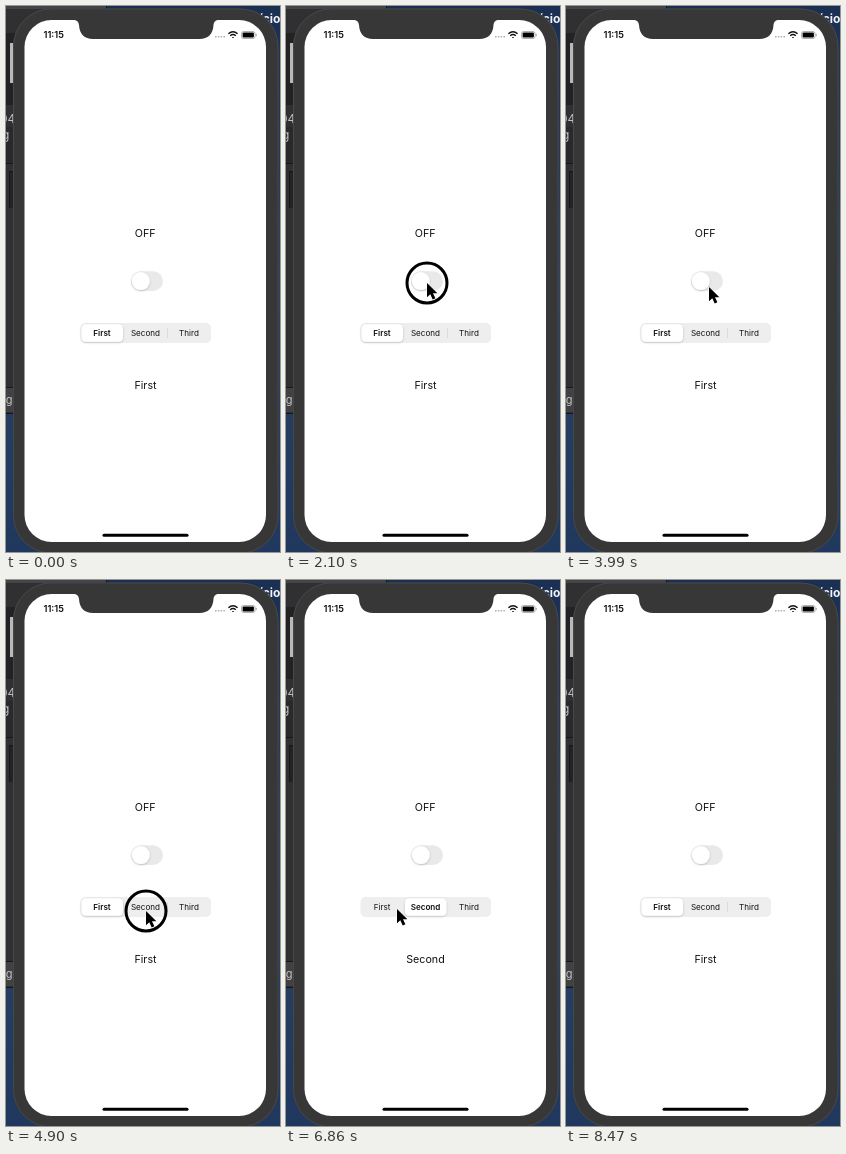
Animation, 274 px wide and 546 px high, one loop 8960 ms. Source, as an HTML page:

```html
<!DOCTYPE html>
<html lang="en">
<head>
<meta charset="utf-8">
<title>Switch and segments</title>
<style>
  html, body { margin: 0; width: 100%; height: 100%; overflow: hidden; background: #1f3456; }
  svg { display: block; width: 274px; height: 546px; }
  text { font-family: Inter, Roboto, "Liberation Sans", sans-serif; }
  .label { font-size: 10.7px; text-anchor: middle; fill: #111; }
  .seg { font-size: 8.1px; text-anchor: middle; fill: #111; }
  .desk { font-size: 12px; fill: #c4c4c6; }
</style>
</head>
<body>
<svg viewBox="0 0 274 546" xmlns="http://www.w3.org/2000/svg">
  <defs>
    <linearGradient id="sea" x1="0" y1="0" x2="0" y2="1">
      <stop offset="0" stop-color="#1b2f52"/>
      <stop offset=".5" stop-color="#2b4264"/>
      <stop offset="1" stop-color="#20385e"/>
    </linearGradient>
    <filter id="soft" x="-30%" y="-30%" width="160%" height="170%">
      <feDropShadow dx="0" dy=".8" stdDeviation=".8" flood-opacity=".22"/>
    </filter>
  </defs>

  <!-- desktop -->
  <rect width="274" height="546" fill="url(#sea)"/>
  <rect width="101" height="408" fill="#303032"/>
  <rect width="101" height="3" fill="#454547"/>
  <path d="M100.5 0V4" stroke="#111"/>
  <rect y="27" width="9" height="72" fill="#222224"/>
  <rect x="4" y="37" width="3" height="40" fill="#b9b9ba"/>
  <rect y="121" width="9" height="36" fill="#29292b"/>
  <rect x="3" y="165" width="6" height="37" fill="#232325"/>
  <path d="M0 157.5H9M3 165.5H9M3.5 165V202M0 381.5H9" stroke="#171719"/>
  <rect y="382" width="9" height="24" fill="#414143"/>
  <path d="M0 407.5H9" stroke="#151517"/>
  <text class="desk" x="-6" y="117">04</text>
  <text class="desk" x="-4" y="133">g</text>
  <text class="desk" x="-3" y="398" style="font-size:11px">ig</text>
  <text x="253.5" y="17" font-size="12" font-weight="700" fill="#f2f4f8">ício</text>

  <!-- phone -->
  <rect x="7" y="2.5" width="265.5" height="545" rx="38" fill="#373738"/>
  <rect x="7.5" y="3" width="264.5" height="544" rx="37.5" fill="none" stroke="#48484a"/>
  <rect x="18.5" y="14" width="241.5" height="522" rx="27" fill="#fff"/>
  <path d="M67 13.5H213V14C209.500 14 208 15.500 207.500 19C207 28 202 33 193.500 33H87C78.500 33 73.500 28 73 19C72.500 15.500 71 14 67 14Z" fill="#373738"/>
  <text x="37.500" y="32" font-size="9.300" font-weight="600" fill="#111">11:15</text>
  <path d="M209 30.800H219" stroke="#b5b5b7" stroke-width="1.500" stroke-dasharray="1.600 1.200"/>
  <g fill="none" stroke="#111" stroke-width="1.400">
    <path d="M222.400 27.800Q227 23.500 231.600 27.800M224.200 29.800Q227 27.300 229.800 29.800"/>
    <path d="M225.800 31L227 32.300L228.200 31Z" fill="#111" stroke="none"/>
  </g>
  <rect x="235.500" y="25.500" width="13.500" height="7" rx="2" fill="none" stroke="#9b9b9d" stroke-width=".8"/>
  <rect x="236.600" y="26.600" width="11.300" height="4.800" rx="1" fill="#000"/>
  <path d="M250.200 27.800V30.200" stroke="#9b9b9d"/>
  <rect x="96.500" y="527.700" width="86" height="3" rx="1.500" fill="#000"/>

  <!-- controls -->
  <text class="label" id="power" x="139.200" y="230.500">OFF</text>
  <rect id="track" x="125" y="265.300" width="32" height="19.700" rx="9.850"/>
  <circle id="knob" cy="275.100" r="9" fill="#fff" filter="url(#soft)"/>
  <rect x="74.500" y="317" width="130.500" height="20" rx="5" fill="#eeeeef"/>
  <path id="bar0" d="M118 322V332" stroke="#d6d6d9" stroke-width=".8"/>
  <path id="bar1" d="M161.500 322V332" stroke="#d6d6d9" stroke-width=".8"/>
  <rect id="thumb" y="318.300" width="41.500" height="17.500" rx="4.300" fill="#fff" filter="url(#soft)"/>
  <g id="segs"></g>
  <text class="label" id="choice" x="139.500" y="382.900">First</text>

  <!-- pointer -->
  <circle id="ring" r="20" fill="none" stroke="#000" stroke-width="3"/>
  <path id="arrow" d="M0 0V14.200L3.300 11.200L5.700 16.500L8.400 15.300L6 10.200H10.400Z"
        fill="#000" stroke="#fff" stroke-width="1" stroke-linejoin="round" paint-order="stroke"/>
</svg>
<script>
const LOOP = 8960, STEP = 70, PRESS = 140, SLIDE = 270;
const names = ["First", "Second", "Third"];
const centers = [96, 139.5, 183];

// pointer path: time, x, y
const path = [
  [350, 161, 510], [490, 162, 400], [560, 161, 355], [630, 160, 325],
  [700, 150, 293], [770, 140, 281], [980, 140, 281], [1260, 141, 242],
  [1470, 141, 242], [1890, 141, 277], [2730, 141, 277], [2870, 139, 278],
  [3360, 139, 278], [3570, 143, 281], [4060, 143, 281], [4690, 140, 331],
  [5250, 140, 331], [5600, 172, 331], [6020, 172, 331], [6230, 141, 331],
  [6580, 141, 331], [6860, 111, 329], [7140, 94, 329], [7560, 94, 329],
  [7770, 104, 400], [7980, 118, 550]
];
const flips = [[2100, 1], [3010, 0]];
const picks = [[4830, 1], [5740, 2], [6300, 1], [7280, 0]];
const presses = [...flips, ...picks].map(([at]) => at);

const $ = id => document.getElementById(id);
const set = (el, attrs) => { for (const k in attrs) el.setAttribute(k, attrs[k]); };
const clamp = u => Math.max(0, Math.min(1, u));
const ease = u => u * u * (3 - 2 * u);
const mix = (a, b, u) => a + (b - a) * u;

const segs = names.map((name, i) => {
  const el = document.createElementNS("http://www.w3.org/2000/svg", "text");
  set(el, { class: "seg", x: centers[i], y: 330.2 });
  el.textContent = name;
  return $("segs").appendChild(el);
});

// chosen value plus its eased position after each release
function stateAt(t, events) {
  let value = 0, pos = 0;
  for (const [at, next] of events) {
    const u = (t - at - PRESS) / SLIDE;
    if (u < 0) break;
    pos = mix(value, next, ease(clamp(u)));
    value = next;
  }
  return { value, pos };
}

function pointerAt(t) {
  const i = path.findIndex(p => p[0] > t);
  if (i < 1) return null;
  const [t0, x0, y0] = path[i - 1], [t1, x1, y1] = path[i];
  const linear = t < 770 || t > 7560;
  const u = (t - t0) / (t1 - t0), e = linear ? u : ease(u);
  return [mix(x0, x1, e), mix(y0, y1, e)];
}

function draw(t) {
  const power = stateAt(t, flips), pick = stateAt(t, picks);
  $("power").textContent = power.value ? "ON" : "OFF";
  $("choice").textContent = names[pick.value];

  const shade = [[233, 52], [233, 199], [234, 89]].map(([a, b]) => Math.round(mix(a, b, power.pos)));
  set($("track"), { fill: `rgb(${shade})` });
  set($("knob"), { cx: mix(134.8, 147.2, power.pos) });

  set($("thumb"), { x: mix(75.5, 162.5, pick.pos / 2) });
  set($("bar0"), { opacity: clamp(pick.pos - 1) });
  set($("bar1"), { opacity: clamp(1 - pick.pos) });
  segs.forEach((el, i) => set(el, { "font-weight": i === pick.value ? 600 : 400 }));

  const tip = pointerAt(t);
  const down = presses.some(at => t >= at && t < at + PRESS);
  const place = tip ? `translate(${tip})` : "translate(-99 -99)";
  set($("arrow"), { transform: place });
  set($("ring"), { transform: place, opacity: down ? 1 : 0 });
}

const start = performance.now();
function tick() {
  const t = (performance.now() - start) % LOOP;
  draw(Math.floor(t / STEP) * STEP);
  requestAnimationFrame(tick);
}
tick();
</script>
</body>
</html>
```
